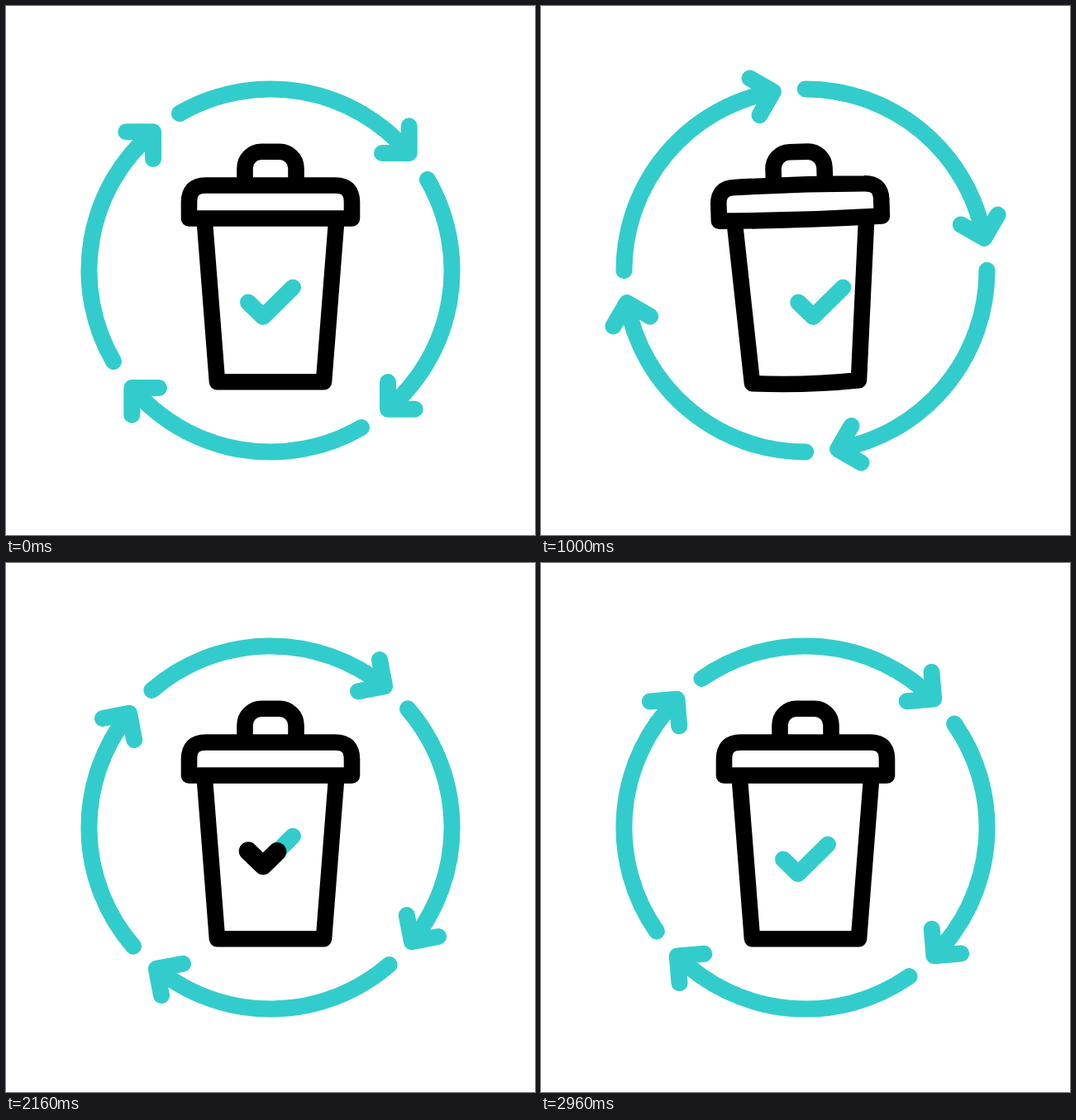
Write an HTML page that moves like this. It is 640 px wide and 640 px high and loops after 3000 ms.

```html
<!DOCTYPE html>
<html lang="en">
<head>
<meta charset="utf-8">
<title>Recycling bin</title>
<style>
  html, body { margin: 0; width: 100%; height: 100%; overflow: hidden; background: #fff; }
  svg { display: block; width: 100vw; height: 100vh; }
</style>
</head>
<body>
<svg viewBox="0 0 640 640" fill="none" stroke-width="20" stroke-linecap="round" stroke-linejoin="round">
  <defs>
    <path id="arrow" d="M210 130A219.6 219.6 0 0 1 487.5 178M487.7 145.3V178H455"/>
    <clipPath id="inside"><path id="body-area"/></clipPath>
  </defs>
  <g id="ring" stroke="#33cccc">
    <use href="#arrow"/>
    <use href="#arrow" transform="rotate(90 320 320)"/>
    <use href="#arrow" transform="rotate(180 320 320)"/>
    <use href="#arrow" transform="rotate(270 320 320)"/>
  </g>
  <g clip-path="url(#inside)">
    <g id="check">
      <path d="M293 358.5L311 376L347 340.5" stroke="#33cccc"/>
      <path id="sweep" d="M293 358.5L311 376L347 340.5" stroke="#000" stroke-width="22.5" pathLength="1"/>
    </g>
  </g>
  <g id="bin" stroke="#000" stroke-width="19.6">
    <path id="handle"/>
    <path id="body"/>
    <path id="lid"/>
  </g>
</svg>
<script>
const LOOP = 3000, STEP = 40;
const $ = id => document.getElementById(id);
const set = (id, attrs) => {
  for (const name in attrs) $(id).setAttribute(name, attrs[name]);
};

const progress = (t, from, to) => Math.min(1, Math.max(0, (t - from) / (to - from)));
const smooth = u => u * u * (3 - 2 * u);
const easeCubic = u => u < 0.5 ? 4 * u ** 3 : 1 - 4 * (1 - u) ** 3;

// Eased value through [time, value] keys
function track(keys, t) {
  let value = keys[0][1];
  for (let i = 1; i < keys.length; i++) {
    const [from, a] = keys[i - 1], [to, b] = keys[i];
    if (t >= from) value = a + (b - a) * smooth(progress(t, from, to));
  }
  return value;
}

const TILT = [[0, 0], [300, 1.2], [720, -5.5], [1240, 1.2], [1600, 0]];
const BOB = [[1480, 0], [1800, 9], [2160, -10], [2500, 0]];

// The check leaves on the left and comes back from the right
function checkShift(t) {
  return t < 800 ? -113 * progress(t, 400, 800) ** 3
                 : 113 * (1 - progress(t, 800, 1240)) ** 3;
}

function drawBin(t) {
  const tilt = track(TILT, t);
  const bow = 1.35 * Math.abs(tilt);
  const turn = `rotate(${tilt} 320 455)`;
  const body = `M240.3 260L255.5 454.7Q320 ${454.7 + 2 * bow} 384.5 454.7L399.7 260`;

  const face = Math.abs(Math.cos(Math.PI * easeCubic(progress(t, 380, 1070))));
  const half = 31 * face, r = Math.min(20, half);
  const x = 320 + 4 * (1 - face), top = 176.3 + 7 * (1 - face);

  set("bin", { transform: turn });
  set("body", { d: body });
  set("body-area", { d: body + "Z", transform: turn });
  set("lid", {
    d: `M221.5 257V237Q221.5 217 241.5 217Q320 ${217 - 0.9 * bow} 398.5 217` +
       `Q418.5 217 418.5 237V257Q320 ${257 + 1.2 * bow} 221.5 257Z`
  });
  set("handle", {
    d: `M${x - half} 210V${top + r}a${r} ${r} 0 0 1 ${r} ${-r}` +
       `H${x + half - r}a${r} ${r} 0 0 1 ${r} ${r}V210`
  });
}

function drawCheck(t) {
  const end = smooth(progress(t, 1800, 2400));
  const start = smooth(progress(t, 2160, 2740));
  set("check", { transform: `translate(${checkShift(t)} ${track(BOB, t)})` });
  set("sweep", {
    visibility: end > 0 && start < 1 ? "visible" : "hidden",
    "stroke-dasharray": `${Math.max(0.001, end - start)} 2`,
    "stroke-dashoffset": -start
  });
}

function render(t) {
  set("ring", { transform: `rotate(${360 * t / LOOP} 320 320)` });
  drawBin(t);
  drawCheck(t);
}

const begin = performance.now();
function tick() {
  const elapsed = (performance.now() - begin) % LOOP;
  render(Math.floor(elapsed / STEP) * STEP);
  requestAnimationFrame(tick);
}
render(0);
requestAnimationFrame(tick);
</script>
</body>
</html>
```
